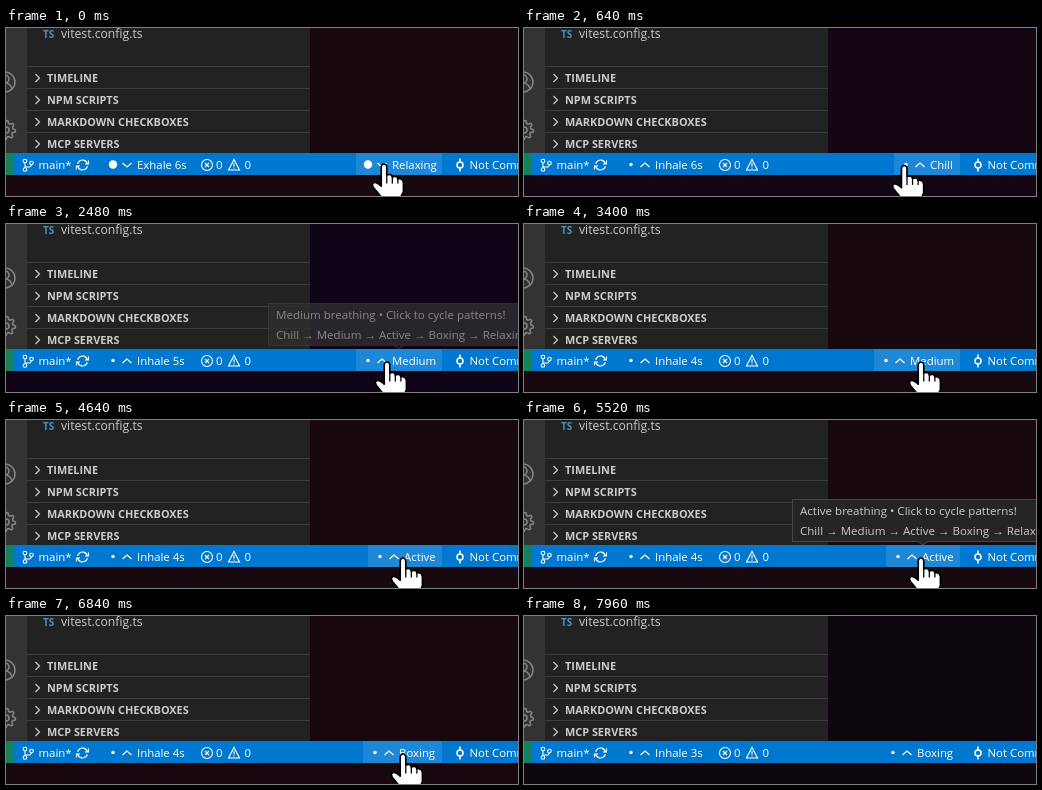
Write an HTML page with a canvas that moves like this. It is 512 px wide and 168 px high and loops after 8000 ms.

```html
<!DOCTYPE html>
<html lang="en">
<head>
<meta charset="utf-8">
<title>Breathing status bar</title>
<style>
html, body { margin: 0; width: 100%; height: 100%; overflow: hidden; background: #140810; }
canvas { display: block; width: 512px; height: 168px; }
</style>
</head>
<body>
<canvas id="stage" width="512" height="168"></canvas>
<script>
const ctx = document.getElementById('stage').getContext('2d');
const LOOP = 8000;
const UI = '"Open Sans", "Noto Sans", sans-serif';

// Stepped values: [start time, value]
const patterns = [[0, 'Relaxing'], [640, 'Chill'], [1720, 'Medium'], [3920, 'Active'], [6040, 'Boxing']];
const phases = [[0, 'Exhale 6s'], [640, 'Inhale 6s'], [1480, 'Inhale 5s'], [2720, 'Inhale 4s'],
  [5640, 'Inhale 3s'], [6040, 'Inhale 4s'], [7040, 'Inhale 3s']];
const labelX = { Relaxing: 386, Chill: 406, Medium: 386, Active: 398, Boxing: 393 };

// Eased values: [time, ...numbers]
const backdrop = [[0, 24, 8, 16], [1400, 15, 5, 23], [2520, 15, 5, 23], [3360, 24, 8, 15],
  [6680, 24, 8, 15], [7800, 14, 7, 16], [8000, 14, 7, 16]];
const pointer = [[0, 378, 136], [240, 378, 136], [840, 381, 138], [2520, 381, 138],
  [3200, 397, 138], [7040, 397, 138], [7700, 376, 172], [8000, 376, 172]];
const hint = [[0, 0], [1200, 0], [1360, 1], [2400, 1], [2580, 0], [4800, 0], [4960, 1],
  [6200, 1], [6360, 0], [8000, 0]];

function stepAt(list, t) {
  return list.filter(item => item[0] <= t).pop()[1];
}

function valueAt(keys, t) {
  const i = Math.max(1, keys.findIndex(k => k[0] >= t));
  const a = keys[i - 1], b = keys[i];
  const p = (t - a[0]) / (b[0] - a[0]);
  const e = p * p * (3 - 2 * p);
  return a.slice(1).map((v, n) => v + (b[n + 1] - v) * e);
}

function rect(x, y, w, h, color) {
  ctx.fillStyle = color;
  ctx.fillRect(x, y, w, h);
}

function text(str, x, y, color = '#fff', size = 11.4, weight = 500) {
  ctx.font = `${weight} ${size}px ${UI}`;
  ctx.fillStyle = color;
  ctx.fillText(str, x, y);
}

function line(points, color = '#fff', width = 1.1) {
  ctx.beginPath();
  points.forEach(([x, y]) => ctx.lineTo(x, y));
  ctx.strokeStyle = color;
  ctx.lineWidth = width;
  ctx.stroke();
}

function ring(x, y, r, color = '#fff', width = 1.1, from = 0, to = Math.PI * 2) {
  ctx.beginPath();
  ctx.arc(x, y, r, from, to);
  ctx.strokeStyle = color;
  ctx.lineWidth = width;
  ctx.stroke();
}

function disc(x, y, r, color = '#fff') {
  ctx.beginPath();
  ctx.arc(x, y, r, 0, Math.PI * 2);
  ctx.fillStyle = color;
  ctx.fill();
}

function drawActivityBar() {
  const gray = '#858585';
  rect(0, 0, 21, 125, '#333333');
  ring(-1, 54, 10, gray, 1.5);
  ring(-1, 51, 4, gray, 1.5);
  ring(-1, 62, 7, gray, 1.5, Math.PI, Math.PI * 2);
  ring(0, 102, 3, gray, 1.5);
  const gear = [];
  for (let i = 0; i <= 32; i++) {
    const a = i * Math.PI / 16;
    const r = i % 4 < 2 ? 9.5 : 7;
    gear.push([Math.cos(a) * r, 102 + Math.sin(a) * r]);
  }
  line(gear, gray, 1.5);
}

function drawSidebar() {
  rect(21, 0, 283, 125, '#222223');
  text('TS', 37, 10, '#4a90c0', 10, 700);
  text('vitest.config.ts', 55, 10, '#cccccc', 12.2, 400);
  ['TIMELINE', 'NPM SCRIPTS', 'MARKDOWN CHECKBOXES', 'MCP SERVERS'].forEach((name, i) => {
    const y = 38 + i * 22;
    rect(21, y, 283, 1, '#3c3c3d');
    line([[29.5, y + 8], [33.5, y + 12], [29.5, y + 16]], '#cccccc', 1.2);
    text(name, 41, y + 16, '#cccccc', 10.9, 700);
  });
}

function drawBreath(label, x, out) {
  disc(x - 24, 136.5, out ? 4.2 : 1.7);
  const d = out ? 2 : -2;
  line([[x - 14.5, 137 - d], [x - 10, 137 + d], [x - 5.5, 137 - d]]);
  text(label, x, 141);
}

function drawSync(x, y) {
  ring(x, y, 5, '#fff', 1.2, -2.9, -0.2);
  ring(x, y, 5, '#fff', 1.2, 0.25, 2.95);
  line([[x + 2.5, y - 1], [x + 6, y - 1], [x + 6, y - 4.5]]);
  line([[x - 2.5, y + 1], [x - 6, y + 1], [x - 6, y + 4.5]]);
}

function drawStatusBar(pattern, phase, hover) {
  const x = labelX[pattern], out = phase[0] === 'E';
  rect(0, 125, 512, 22, '#0078d0');
  rect(0, 125, 8, 22, '#16825d');
  if (hover) rect(x - 36, 125, 472 - x, 22, 'rgba(255,255,255,.12)');

  ring(19, 133, 1.8);
  ring(19, 141.5, 1.8);
  ring(25.5, 135, 1.8);
  line([[19, 135], [19, 139.5]]);
  line([[25.5, 137], [24, 139], [19, 139]]);
  text('main*', 32.5, 141);
  drawSync(76.5, 137);

  drawBreath(phase, 131, out);

  ring(201, 137, 5.5);
  line([[199, 135], [203, 139]]);
  line([[203, 135], [199, 139]]);
  text('0', 210, 141);
  line([[228, 131.5], [233.5, 142], [222.5, 142], [228, 131.5], [228.5, 132.5]]);
  line([[228, 135], [228, 138.5]]);
  rect(227.5, 139.5, 1, 1, '#fff');
  text('0', 238.5, 141);

  drawBreath(pattern, x, out);
  ring(454, 137, 3, '#fff', 1.5);
  line([[454, 130.5], [454, 134]], '#fff', 1.5);
  line([[454, 140], [454, 143.5]], '#fff', 1.5);
  text('Not Committed Yet', 463.5, 141);
}

function drawHint(pattern, alpha) {
  if (alpha <= 0) return;
  const mid = (labelX[pattern] - 36 + 436) / 2, left = mid - 131;
  ctx.save();
  ctx.globalAlpha = alpha;
  rect(left, 79, 262, 43, '#454545');
  rect(left + 1, 80, 260, 41, '#252526');
  ctx.beginPath();
  ctx.moveTo(mid - 5, 121);
  ctx.lineTo(mid, 125);
  ctx.lineTo(mid + 5, 121);
  ctx.fillStyle = '#252526';
  ctx.fill();
  line([[mid - 5, 121.5], [mid, 125], [mid + 5, 121.5]], '#454545', 1);
  text(pattern + ' breathing • Click to cycle patterns!', left + 8, 95, '#cccccc', 11.55, 400);
  text('Chill → Medium → Active → Boxing → Relaxing', left + 8, 115, '#cccccc', 11.55, 400);
  ctx.restore();
}

// Pointing hand, fingertip at (x, y)
const hand = new Path2D('M5 2Q5 0 6.5 0T8 2V6Q10.5 5 11 7Q13.5 6 14 8Q16.5 7.5 17 10V15' +
  'L15 19V22H6V19L1 13Q-.5 11 1 10Q2.5 9.5 5 12Z');

function drawPointer(x, y) {
  ctx.save();
  ctx.translate(x - 6.5 * 1.85, y);
  ctx.scale(1.85, 1.85);
  ctx.fillStyle = '#fff';
  ctx.strokeStyle = '#000';
  ctx.lineWidth = 0.9;
  ctx.lineJoin = 'round';
  ctx.fill(hand);
  ctx.stroke(hand);
  [8, 11, 14].forEach((kx, i) => line([[kx, 6 + i], [kx, 10.5]], '#000', 0.7));
  ctx.restore();
}

function draw(now) {
  const t = now % LOOP;
  const pattern = stepAt(patterns, t), phase = stepAt(phases, t);
  const [px, py] = valueAt(pointer, t);
  rect(0, 0, 512, 168, `rgb(${valueAt(backdrop, t).map(Math.round)})`);
  drawActivityBar();
  drawSidebar();
  drawStatusBar(pattern, phase, py < 147);
  drawHint(pattern, valueAt(hint, t)[0]);
  drawPointer(px, py);
}

function loop() {
  draw(performance.now());
  requestAnimationFrame(loop);
}
loop();
</script>
</body>
</html>
```
